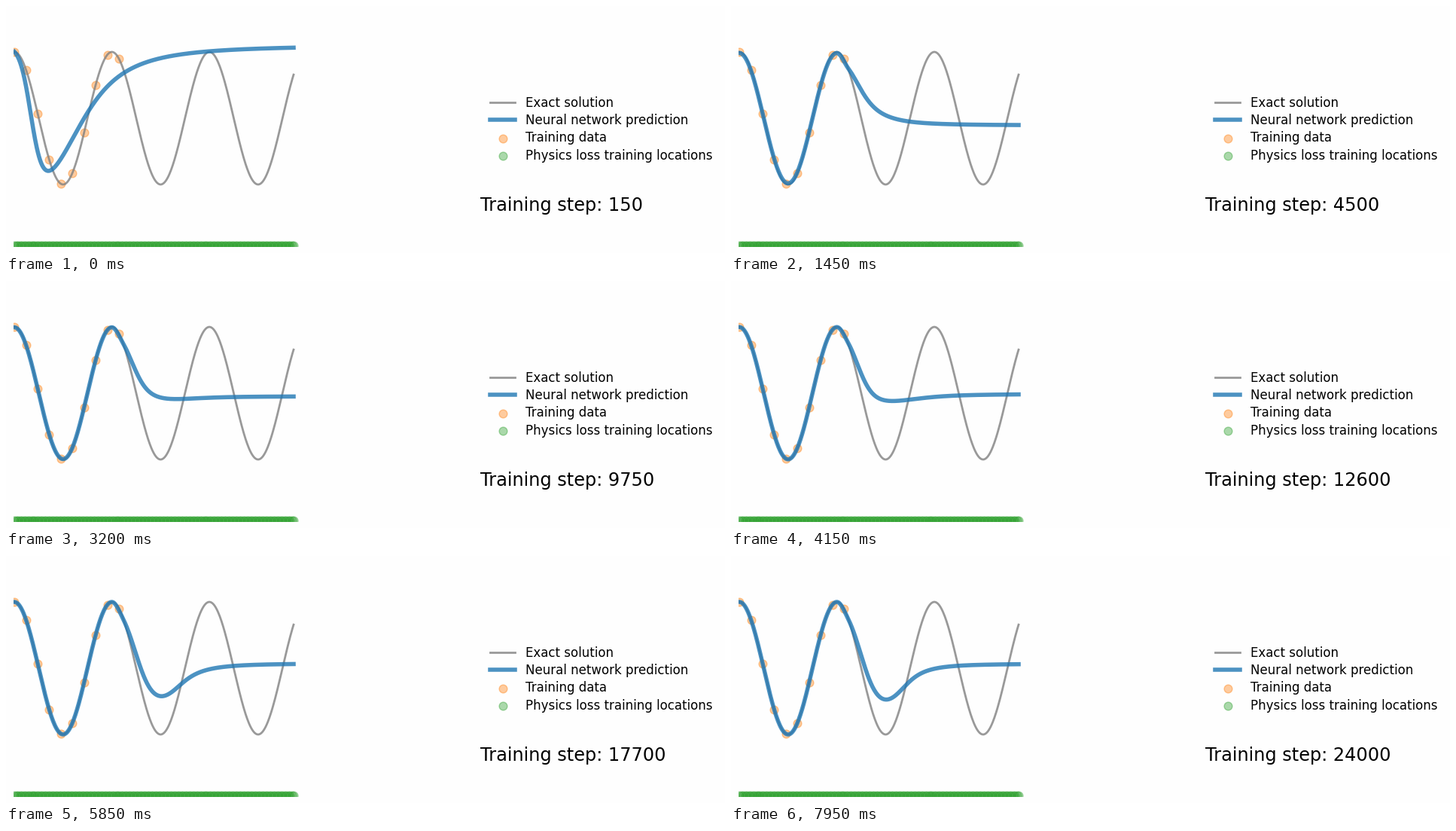
Write a matplotlib script that moves like this. It is 955x328 px and loops after 8 s.

```python
import numpy as np
import matplotlib.pyplot as plt
from matplotlib.animation import FuncAnimation

W, H, DPI = 955, 328, 100
FRAMES, INTERVAL = 160, 50
LEFT, RIGHT, TOP, BOTTOM = 10, 600, 10, 319     # plot window in pixels
X0, X1 = 11.1, 382.0                            # span of the curves
MID, AMP, PERIOD = 149.0, 88.0, 129.5
X = np.linspace(X0, X1, 500)

plt.rcParams["font.family"] = "DejaVu Sans"


def exact(x):
    return MID - AMP * np.cos(2 * np.pi * (x - X0) / PERIOD)


def fall(x, centre, width, start, end):
    """Logistic step from start to end."""
    return start + (end - start) / (1 + np.exp(-(x - centre) / width))


def rise(x, centre, width, height):
    """Algebraic step with long tails."""
    u = (x - centre) / width
    return height * (1 + u / np.sqrt(1 + u * u)) / 2


def shape(frame, join, down, up):
    """Exact solution up to the join, then one step down and one step up."""
    gain = 1 - 0.04 * np.exp(-frame / 30)
    head = MID + gain * (exact(X) - MID)
    tail = fall(X, *down) - rise(X, *up)
    s = np.clip((X - join) / 20, 0, 1)
    return head + s * s * (3 - 2 * s) * (tail - head)


# frame: (join, (fall centre, width, start, end), (rise centre, width, height))
STATES = {
    0: (-20, (33, 8, 80, 306), (87, 69, 254)),
    4: (108, (108, 12, 237, 237), (118, 60, 260)),
    8: (140, (165, 13, 60, 100), (230, 60, -30)),
    15: (140, (170, 13.5, 57, 128.5), (205, 60, -32)),
    43: (140, (166, 11.2, 57, 149.5), (205, 31, -7)),
    83: (140, (167.5, 10.5, 57, 166), (235, 60, 16)),
    98: (140, (170.4, 12, 57, 199.5), (229, 50, 58)),
    159: (140, (172.7, 11.8, 56, 217), (226, 31, 74)),
}
KEYS = list(STATES)
SHAPES = [shape(k, *state) for k, state in STATES.items()]


def prediction(frame):
    j = min(np.searchsorted(KEYS, frame, side="right"), len(KEYS) - 1)
    s = (frame - KEYS[j - 1]) / (KEYS[j] - KEYS[j - 1])
    if j == len(KEYS) - 1:
        s = 1 - np.exp(-3.7 * s)                # training settles
    return SHAPES[j - 1] + s * (SHAPES[j] - SHAPES[j - 1])


fig = plt.figure(figsize=(W / DPI, H / DPI), dpi=DPI, facecolor="#fefefe")
ax = fig.add_axes([LEFT / W, 1 - BOTTOM / H, (RIGHT - LEFT) / W, (BOTTOM - TOP) / H])
ax.set(xlim=(LEFT, RIGHT), ylim=(BOTTOM, TOP))
ax.axis("off")

GREY = dict(color="grey", lw=2, alpha=0.8)
BLUE = dict(color="tab:blue", lw=4, alpha=0.8)
ORANGE = dict(color="tab:orange", s=60, alpha=0.4)
GREEN = dict(color="tab:green", s=60, alpha=0.4)

ax.plot(X, exact(X), **GREY)
curve, = ax.plot(X, prediction(0), **BLUE)
data_x = X0 + 15.43 * np.arange(10)
ax.scatter(data_x, exact(data_x), **ORANGE)
ax.scatter(np.linspace(X0, X1, 150), np.full(150, 318), **GREEN)

LEGEND = [("Exact solution", GREY), ("Neural network prediction", BLUE),
          ("Training data", ORANGE), ("Physics loss training locations", GREEN)]
for i, (label, style) in enumerate(LEGEND):
    base = 134 + 23.2 * i
    if "lw" in style:
        ax.plot([643, 676.3], [base - 5.8] * 2, clip_on=False, **style)
    else:
        ax.scatter([660.3], [base - 4.4], clip_on=False, **style)
    ax.text(690, base, label, size="large", va="baseline")

step = ax.text(630, 272, "", size="xx-large", va="baseline")


def update(frame):
    curve.set_ydata(prediction(frame))
    step.set_text(f"Training step: {150 * (frame + 1)}")
    return curve, step


anim = FuncAnimation(fig, update, frames=FRAMES, interval=INTERVAL,
                     repeat=True, repeat_delay=0)
plt.show()
```
